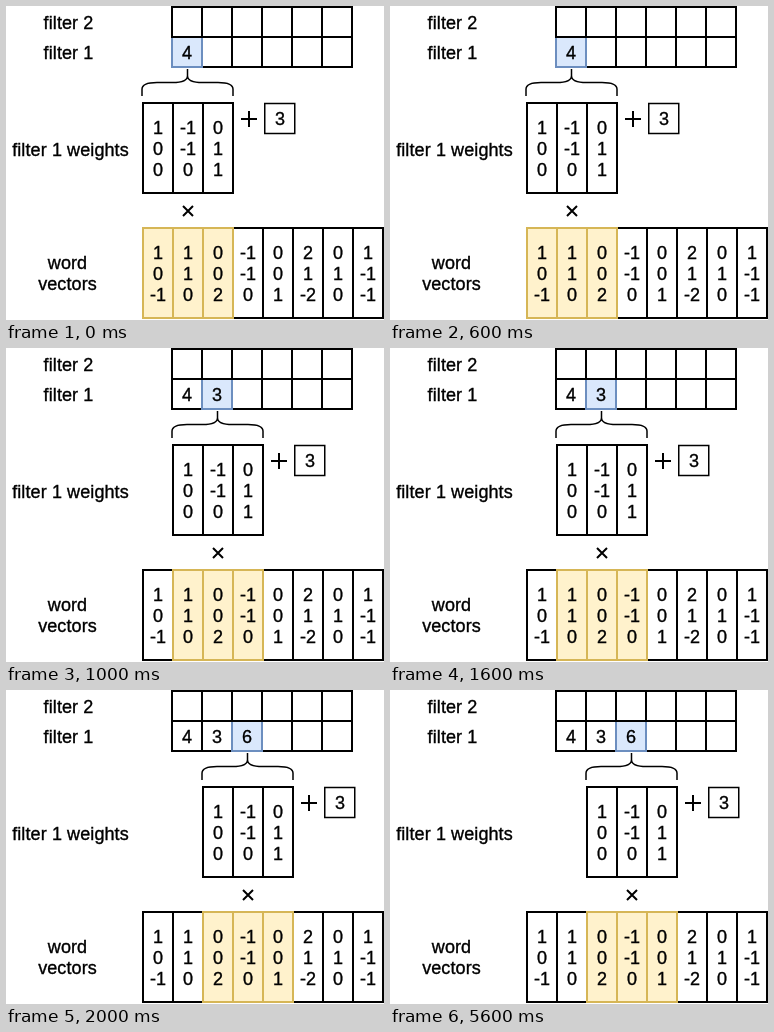
An HTML page that plays this animation: 378x314 px, repeating every 8000 ms.

```html
<!DOCTYPE html>
<html lang="en">
<head>
<meta charset="utf-8">
<title>Convolution filter</title>
<style>
  html, body { margin: 0; width: 100%; height: 100%; overflow: hidden; background: #fff; }
  svg { display: block; }
  text {
    font: 18px "Liberation Sans", Arial, sans-serif;
    text-anchor: middle; letter-spacing: 0.1px;
    stroke: #000; stroke-width: 0.35;
  }
  path { fill: none; }
</style>
</head>
<body>
<svg id="stage" width="378" height="314" viewBox="0 0 378 314"></svg>
<script>
const CELL = 30, LEFT = 137, TOP_LEFT = 166;
const LOOP = 8000, STEP = 1000;
const words = [[1, 0, -1], [1, 1, 0], [0, 0, 2], [-1, -1, 0],
               [0, 0, 1], [2, 1, -2], [0, 1, 0], [1, -1, -1]];
const weights = [[1, 0, 0], [-1, -1, 0], [0, 1, 1]];
const results = [4, 3, 6];
const stage = document.getElementById("stage");

function add(name, attrs, parent = stage) {
  const el = document.createElementNS("http://www.w3.org/2000/svg", name);
  for (const key in attrs) el.setAttribute(key, attrs[key]);
  parent.appendChild(el);
  return el;
}

function label(str, x, y, parent) {
  const el = add("text", { x, y }, parent);
  el.textContent = str;
  return el;
}

function path(d, parent, width = 1.5) {
  return add("path", { d, stroke: "#000", "stroke-width": width }, parent);
}

// A row of boxes, each one cell wide.
function boxes(x, y, count, height, parent, style = {}) {
  for (let i = 0; i < count; i++) {
    add("rect", { x: x + i * CELL, y, width: CELL, height,
      fill: "none", stroke: "#000", "stroke-width": 2, ...style }, parent);
  }
}

function columns(data, x, y, parent) {
  data.forEach((col, i) => col.forEach((n, j) =>
    label(n, x + (i + 0.5) * CELL, y + j * 21.3, parent)));
}

boxes(TOP_LEFT, 31, 6, CELL);
boxes(LEFT, 222, 8, 90);

// Everything in this group slides one cell per step.
const slider = add("g", {});
boxes(TOP_LEFT, 31, 1, CELL, slider, { fill: "#dae8fc", stroke: "#6c8ebf" });
boxes(LEFT, 222, 3, 90, slider, { fill: "#fff2cc", stroke: "#d6b656" });
path("M136 90V83.25Q136 76.5 151 76.5H166.5Q181.5 76.5 181.5 69.75V63" +
     "V69.75Q181.5 76.5 196.5 76.5H212Q227 76.5 227 83.25V90", slider);
boxes(LEFT, 97, 3, 90, slider);
columns(weights, LEFT, 127.5, slider);
path("M235 113h16M243 105v16", slider, 2);
boxes(258.75, 97.5, 1, CELL, slider, { "stroke-width": 1.5 });
label(3, 274, 119, slider);
path("M177 200l10 10M187 200l-10 10", slider, 2);

boxes(TOP_LEFT, 1, 6, CELL);
label("filter 2", 62.5, 23);
label("filter 1", 62.5, 53);
label("filter 1 weights", 64.5, 149.5);
label("word", 61.5, 262.5);
label("vectors", 61.5, 283.5);
columns(words, LEFT, 252.5);
const outputs = results.map((n, i) => label(n, TOP_LEFT + (i + 0.5) * CELL, 53));

function draw(ms) {
  const step = Math.min(2, Math.floor((ms % LOOP) / STEP));
  slider.setAttribute("transform", `translate(${step * CELL} 0)`);
  outputs.forEach((el, i) => el.setAttribute("visibility", i <= step ? "visible" : "hidden"));
}

const start = performance.now();
function tick() {
  draw(performance.now() - start);
  requestAnimationFrame(tick);
}
draw(0);
requestAnimationFrame(tick);
</script>
</body>
</html>
```
